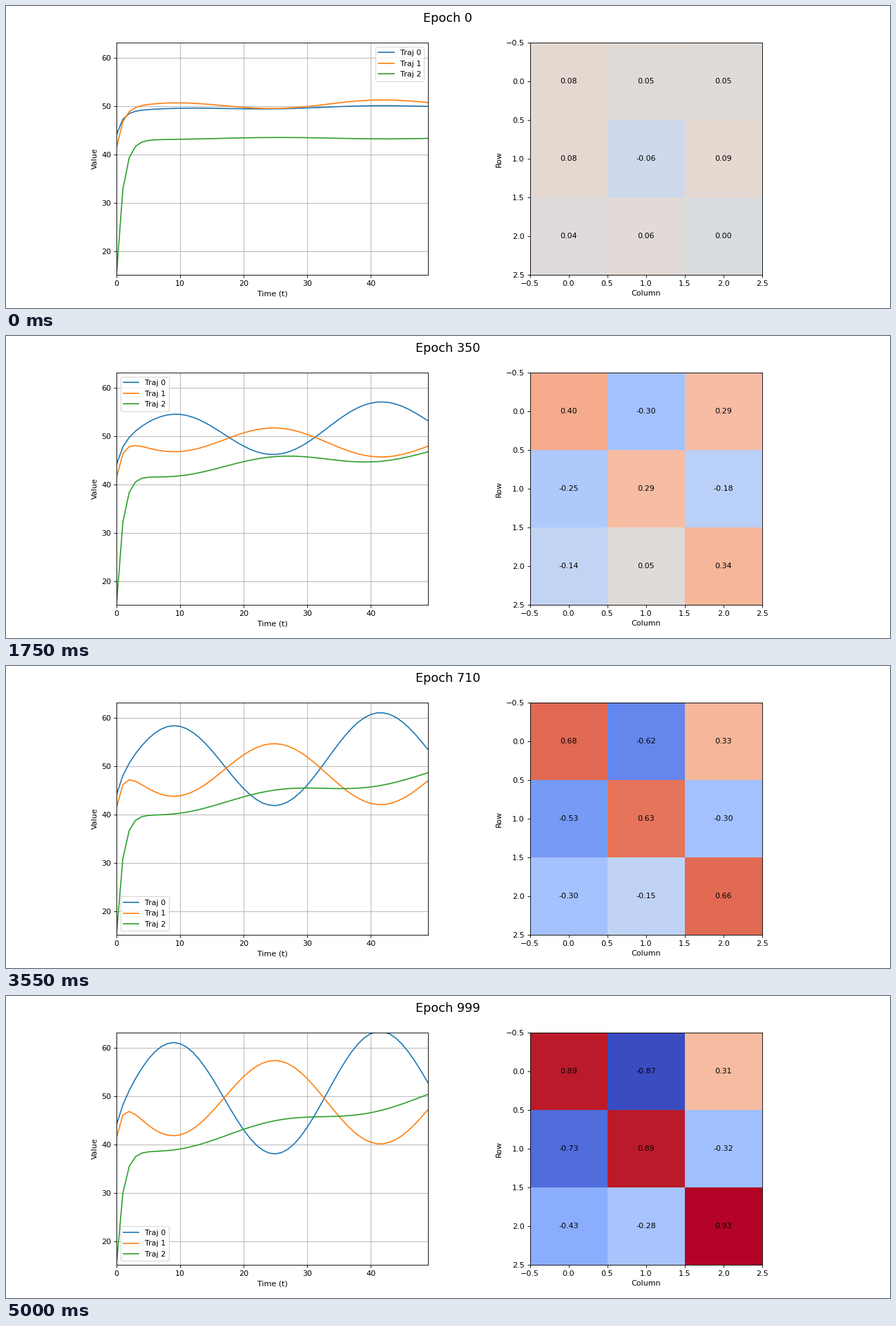
These frames come from a looping animation (1280x437 px, 5050 ms). A matplotlib script:

```python
import numpy as np
import matplotlib.pyplot as plt
from matplotlib.animation import FuncAnimation

FRAMES, INTERVAL, LAST_EPOCH = 101, 50, 999
WIDTH, HEIGHT, DPI = 1280, 437, 80

# Weights drift from START to END, bent on the way; FADE is set per row
START = np.array([[.08, .054, .05], [.08, -.064, .093], [.038, .063, .002]])
END = np.array([[.89, -.87, .31], [-.73, .894, -.32], [-.43, -.284, .93]])
BEND = np.array([[.19, -.19, .9], [-.22, .11, -.66], [-.14, 1.36, .1]])
FADE = np.array([[.9], [.4], [3]])

# Each trajectory relaxes to its rest level and is pushed by three inputs
X0 = np.array([44.1, 41.4, 15.2])[:, None]
REST = np.array([48.05, 49.6, 42.45])[:, None]
GAIN = np.array([1, .735, 1])[:, None]


def epoch(i):
    return min(10 * i, LAST_EPOCH)


def weights(i):
    x = epoch(i) / LAST_EPOCH
    return START + (END - START) * x + BEND * x * (1 - x) * np.exp(-FADE * x)


def waves(t):
    rise = 8.4 + 7 * np.cos(2 * np.pi * (t - 9) / 32)
    fall = 8.6 + .02 * t - 6.7 * np.cos(2 * np.pi * (t - 8.6) / 33)
    return np.array([rise, fall])


time = np.arange(50)
decay = np.exp(-time)
base = REST + (X0 - REST) * decay
dip = .9 * time * np.exp(-time / 3.2)
pair = waves(time) - waves(0)[:, None] * decay - dip
ramp = 1 - decay + .285 * time
inputs = np.vstack([pair, ramp])

fig, (ax, ax_w) = plt.subplots(1, 2, figsize=(WIDTH / DPI, HEIGHT / DPI), dpi=DPI)
fig.subplots_adjust(bottom=48 / HEIGHT, top=384 / HEIGHT)
title = fig.suptitle("", fontsize=16)

lines = [ax.plot(time, base[i], label=f"Traj {i}")[0] for i in range(3)]
ax.set(xlim=(0, 49), ylim=(15.2, 63.07), xlabel="Time (t)", ylabel="Value")
ax.grid(True)
ax.legend(loc="best")

image = ax_w.imshow(START, cmap="coolwarm", vmin=END.min(), vmax=END.max())
ax_w.set(xlabel="Column", ylabel="Row")
cells = {(r, c): ax_w.text(c, r, "", ha="center", va="center")
         for r in range(3) for c in range(3)}


def update(i):
    w = weights(i)
    title.set_text(f"Epoch {epoch(i)}")
    for line, y in zip(lines, base + GAIN * (w @ inputs)):
        line.set_ydata(y)
    image.set_data(w)
    for rc, cell in cells.items():
        cell.set_text(f"{w[rc]:.2f}")


anim = FuncAnimation(fig, update, frames=FRAMES, init_func=lambda: update(0),
                     interval=INTERVAL, repeat=True, repeat_delay=0)
plt.show()
```
